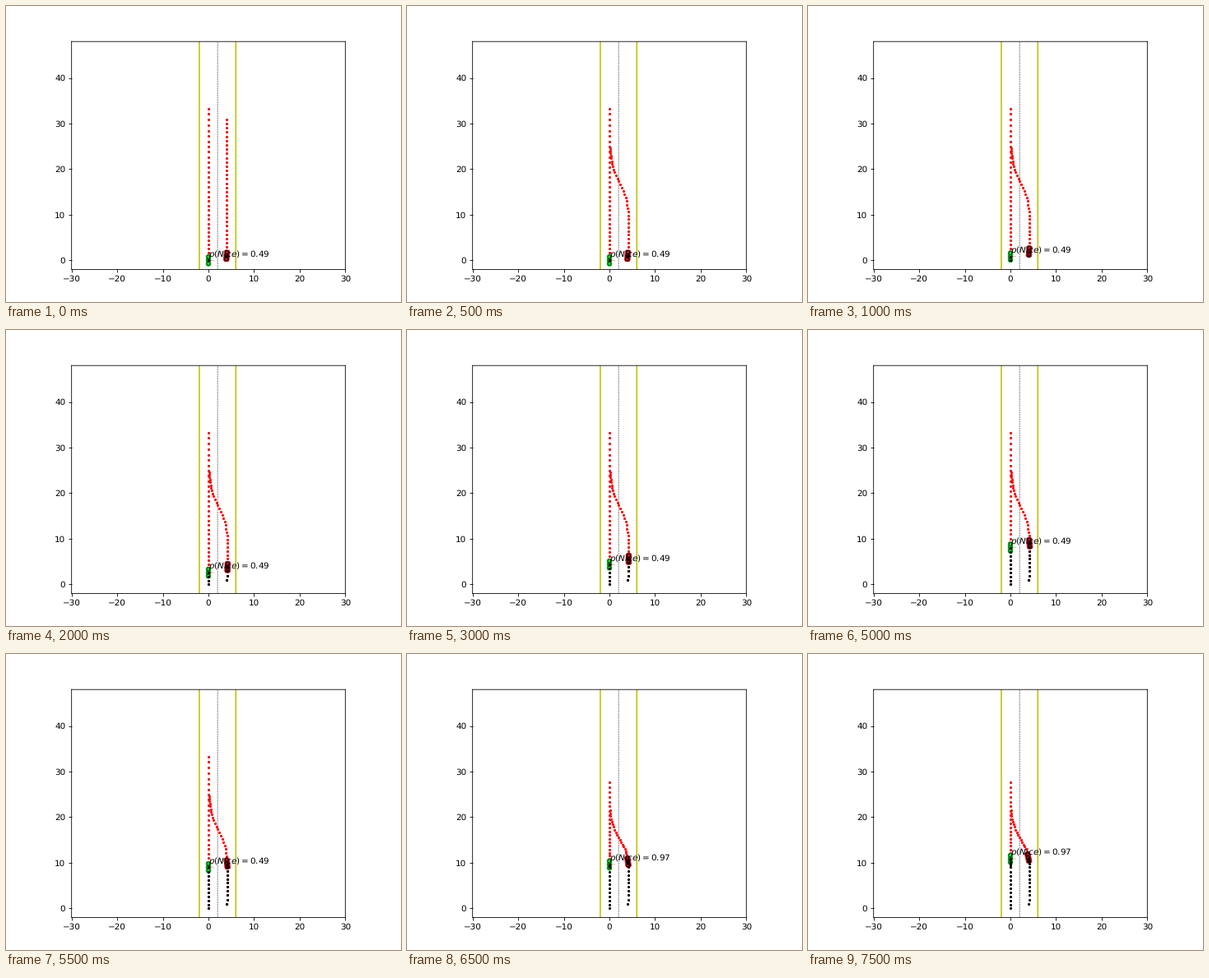
Recreate the animation shown at these times as a matplotlib script. Size 480x360 px, loop 8 s.

```python
import numpy as np
import matplotlib.pyplot as plt
from matplotlib.animation import FuncAnimation
from matplotlib.patches import Circle, FancyBboxPatch
from matplotlib.transforms import Affine2D

# Unsnapped lines and unhinted text give soft, evenly spaced edges.
plt.rcParams.update({"path.snap": False, "text.hinting": "no_hinting"})

FRAMES, INTERVAL = 16, 500
REPLAN = 10          # executed steps before the second plan
HORIZON = 32


def merge_x(y, mid, width):
    """Lateral position while changing from the right lane to the left."""
    return 4.3 / (1 + np.exp((y - mid) / width)) - 0.3 * np.exp((1 - y) / 2.5)


i1 = np.arange(HORIZON + 1)
i2 = np.arange(HORIZON - REPLAN + 1)

ego1_y = 0.84 * i1 + 0.0063 * i1**2
other1_y = 1 + 0.95 * i1 - 0.0067 * i1**2
ego2_y = ego1_y[REPLAN] + 0.58 * i2 + 0.012 * i2**2
other2_y = other1_y[REPLAN] + 0.42 * i2 + 0.005 * i2**2

ego1 = np.column_stack([0 * ego1_y, ego1_y])
ego2 = np.column_stack([0 * ego2_y, ego2_y])
straight = np.column_stack([0 * i1 + 4, 1 + 0.935 * i1])
other1 = np.column_stack([merge_x(other1_y, 17.1, 2.2), other1_y])
other2 = np.column_stack([merge_x(other2_y, 15.3, 1.8), other2_y])

ego_path = np.vstack([ego1[:REPLAN], ego2])
other_path = np.vstack([other1[:REPLAN], other2])


class Car:
    def __init__(self, ax, color, ring, half_width):
        box = FancyBboxPatch((-half_width, -1.25), 2 * half_width, 2.5,
                             boxstyle="round,pad=0,rounding_size=0.4",
                             fc=color, ec=color, lw=0.8, zorder=3)
        rings = [Circle((0, d), 0.4, fc="none", ec=ring, lw=0.9, zorder=3.5)
                 for d in (-0.75, 0, 0.75)]
        self.ax = ax
        self.parts = [box, *rings]
        for part in self.parts:
            ax.add_patch(part)

    def place(self, path, n):
        x, y = path[n]
        dx, dy = path[n + 1] - path[n]
        pose = Affine2D().rotate(np.arctan2(dy, dx) - np.pi / 2).translate(x, y)
        for part in self.parts:
            part.set_transform(pose + self.ax.transData)


fig, ax = plt.subplots(figsize=(6.4, 4.8), dpi=75)
ax.set_aspect("equal")
ax.set_xlim(-30, 30)
ax.set_ylim(-2, 48)

for x in (-2, 6):
    ax.plot([x, x], [-10, 60], "y", lw=1.5)
ax.plot([2, 2], [-10, 60], "k--", lw=0.5)

ego_car = Car(ax, "#10d428", "#064a10", 0.5)
other_car = Car(ax, "#c8101c", "black", 0.6)
plans = [ax.plot([], [], "r.", ms=4, zorder=2.5)[0] for _ in range(2)]
trails = [ax.plot([], [], "k.", ms=4, zorder=4)[0] for _ in range(2)]
pointer, = ax.plot([], [], "r", lw=0.5, alpha=0.6, zorder=4)
label = ax.text(0, 0, "", fontsize=10, zorder=5)


def step_at(k):
    if k < 12:
        return max(0, k - 1)
    return k - 2


def draw(k):
    n = step_at(k)
    if k == 0:
        routes = ego1, straight
    elif k < 13:
        routes = ego1, other1
    else:
        routes = ego2, other2
    for line, route in zip(plans, routes):
        line.set_data(*route.T)
    for line, path in zip(trails, (ego_path, other_path)):
        line.set_data(*path[:n + 1].T)
    ego_car.place(ego_path, n)
    other_car.place(other_path, n)
    y = ego_path[n, 1]
    pointer.set_data([0, 1.2], [y, y])
    label.set_position((0, y + 0.85))
    label.set_text(f"$p(Nice) = {0.49 if k < 12 else 0.97}$")
    return [*plans, *trails, pointer, label]


anim = FuncAnimation(fig, draw, frames=FRAMES, interval=INTERVAL,
                     repeat=True, repeat_delay=0, blit=False)
plt.show()
```
